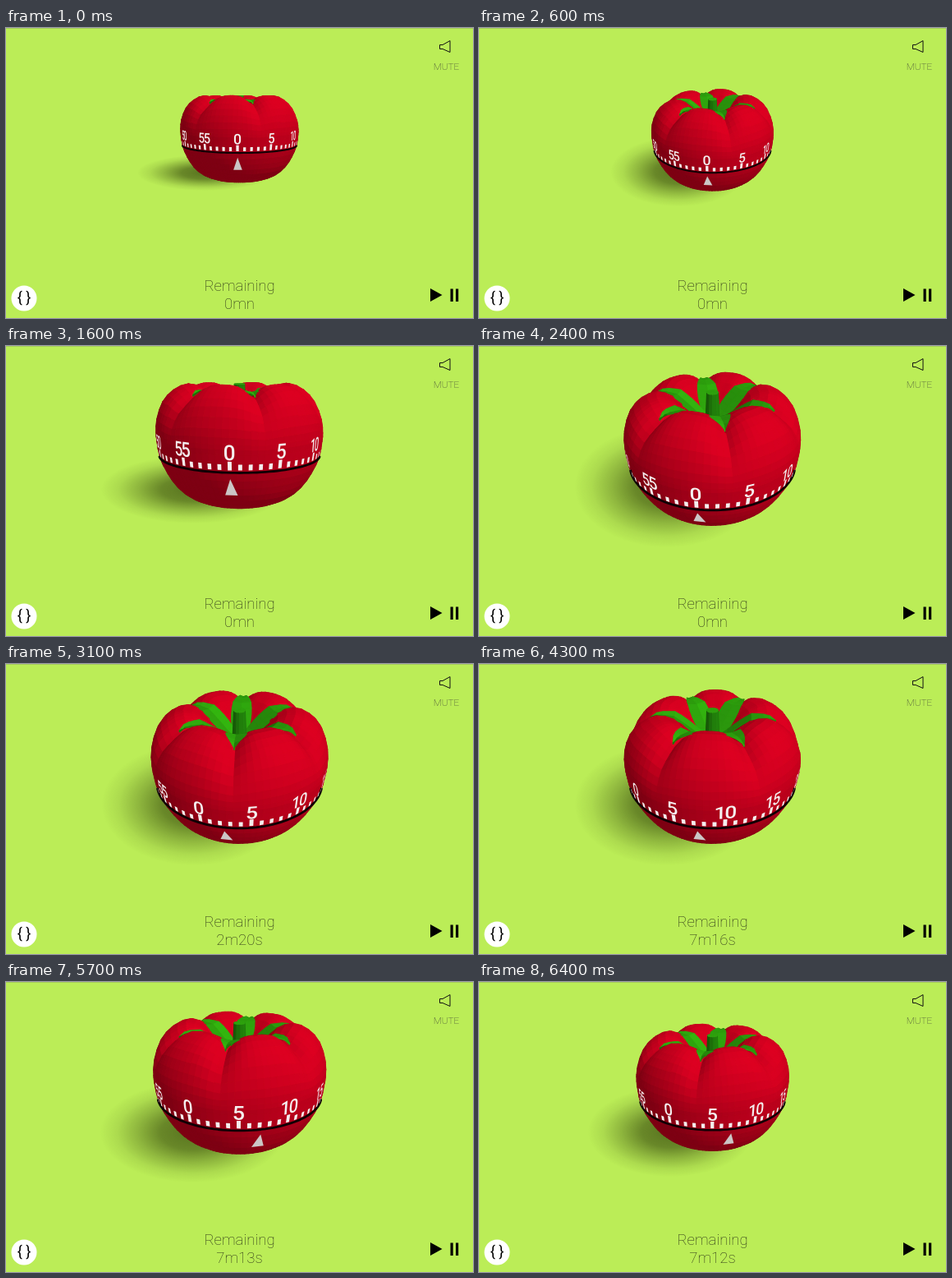
An HTML page with a canvas for the animation above (6.5 s loop, 569 px wide and 353 px high).

```html
<!DOCTYPE html>
<html lang="en">
<head>
<meta charset="utf-8">
<title>Tomato timer</title>
<style>
html, body { margin: 0; width: 100%; height: 100%; overflow: hidden; background: #bbed57; }
canvas, svg { position: absolute; left: 0; top: 0; }
text { font-family: Roboto, sans-serif; font-weight: 200; text-anchor: middle; }
</style>
</head>
<body>
<canvas id="stage" width="569" height="353"></canvas>
<svg width="569" height="353">
  <path d="M0 .5H569" stroke="#a5ca5d"/>
  <path d="M528.5 20.5H532L541 15.5V29.5L532 25.5H528.5Z" fill="none" stroke="#111"/>
  <text x="536.5" y="51" font-size="11.7" fill="#333">MUTE</text>
  <text x="284.5" y="320" font-size="18.6" fill="#2c3318">Remaining</text>
  <text x="284.5" y="342" font-size="18.6" fill="#2c3318" id="left">0mn</text>
  <circle cx="22" cy="329" r="15.5" fill="#fff"/>
  <text x="22" y="333.5" font-size="18" style="font-weight:400">{ }</text>
  <path d="M517 317L531.5 325L517 333ZM541.5 317.5h3.2v15.5h-3.2ZM548 317.5h3.2v15.5h-3.2Z"/>
</svg>
<script>
const ctx = document.getElementById('stage').getContext('2d');
const label = document.getElementById('left');
const { sin, cos, abs, max, min, floor, hypot, PI } = Math;
const LOOP = 6500, FOCAL = 426, CX = 284.5, CY = 176.5, RAD = PI / 180;
const SEGS = 90, SUB = 2, SPLIT = 5, SEAM = .515;

// time, distance, elevation, azimuth
const CAMERA = [
  [0, 6.2, 12.3, -1.7], [300, 6.2, 12.3, -1.7], [600, 6.2, 27.5, -4.6],
  [1000, 5.9, 34, -5.5], [1300, 4.55, 33, -5.6], [1500, 4.55, 33, -5.6],
  [1600, 4.55, 18.4, -5.6], [2200, 4.55, 37.5, -9.2], [4300, 4.55, 37.5, -9.2],
  [5000, 4.55, 29.5, 12.9], [5800, 4.55, 29.5, 12.9], [6400, 5.08, 29.5, 13.1]
];
// time, seconds on the dial
const DIAL = [[0, 0], [2400, 0], [2800, 100], [2950, 100], [4200, 436.7], [6500, 432.1]];

// height, radius from the foot up to the stem
const PROFILE = [
  [-.07, .3], [-.05, .48], [.03, .67], [.16, .81], [.33, .91], [SEAM, .98], [.7, .998],
  [.8, 1], [.95, .98], [1.14, .9], [1.27, .77], [1.335, .6], [1.28, .42], [1.13, .26],
  [.99, .12], [.94, 0]
];
// Six lobes; a leaf lies along each crease between them.
const LOBES = 6, CREASE = 19 * RAD, DEPTH = .14;
const RED = [222, 0, 34], GREEN = [52, 182, 16];
const LIGHT = [.45, .74, .5];

function interp(rows, x) {
  let i = rows.findIndex(r => r[0] >= x);
  if (i < 0) return rows[rows.length - 1].slice(1);
  i = max(1, i);
  const a = rows[i - 1], b = rows[i], k = (x - a[0]) / (b[0] - a[0]);
  return a.slice(1).map((v, n) => v + (b[n + 1] - v) * k);
}

const TOP = PROFILE.slice(8).reverse().map(([y, r]) => [r, y]);
const wall = y => interp(PROFILE.slice(0, 12), y)[0];
const lid = r => interp(TOP, r)[0];

function smooth(points) {
  const rows = [], at = i => points[min(points.length - 1, max(0, i))];
  for (let i = 0; i < points.length - 1; i++)
    for (let s = 0; s < SUB; s++) {
      const t = s / SUB;
      rows.push([0, 1].map(n => {
        const [a, b, c, d] = [-1, 0, 1, 2].map(o => at(i + o)[n]);
        return b + t / 2 * (c - a + t * (2 * a - 5 * b + 4 * c - d + t * (3 * b - a - 3 * c + d)));
      }));
    }
  return [...rows, at(points.length)];
}
const ROWS = smooth(PROFILE);

let dist, elev, azim, turn, faces;

const polar = (r, angle, y) => [r * sin(angle), y, r * cos(angle)];

function project([x, y, z]) {
  const w = z * cos(elev) + y * sin(elev), s = FOCAL / (dist - w);
  return [CX + x * s, CY - (y * cos(elev) - z * sin(elev)) * s, w];
}

// negative for outlines that face the viewer
const winding = ([a, b, c, d]) =>
  (c[0] - a[0]) * (d[1] - b[1]) - (c[1] - a[1]) * (d[0] - b[0]);

function trace(points) {
  ctx.beginPath();
  points.forEach(p => ctx.lineTo(p[0], p[1]));
}

function fill(points, color) {
  trace(points);
  ctx.closePath();
  ctx.fillStyle = color;
  ctx.fill();
}

function addFace(quad, base, bias = 0, twoSided = false) {
  const pts = quad.map(project);
  if (!twoSided && winding(pts) >= 0) return;
  const [a, b, c, d] = quad;
  const u = c.map((v, i) => v - a[i]), v = d.map((q, i) => q - b[i]);
  let n = [u[1] * v[2] - u[2] * v[1], u[2] * v[0] - u[0] * v[2], u[0] * v[1] - u[1] * v[0]];
  if (twoSided && n[1] < 0) n = n.map(q => -q);
  const size = hypot(...n) || 1;
  const lit = .57 + .43 * max(0, n.reduce((sum, q, i) => sum + q * LIGHT[i], 0) / size);
  faces.push({
    pts, w: pts.reduce((sum, p) => sum + p[2], 0) / 4 + bias,
    color: `rgb(${base.map(q => floor(q * lit))})`
  });
}

function addBody() {
  const vertex = ([y, r], j, spin) => {
    const angle = j / SEGS * 2 * PI;
    const crease = (1 - abs(sin(LOBES / 2 * (angle - CREASE)))) ** 1.6;
    const k = crease * min(1, max(0, (y - .65) / .6)) ** 1.5;
    return polar(r * (1 - .03 * k), angle + spin, y - DEPTH * k * min(1, r * 2));
  };
  for (let i = 0; i < ROWS.length - 1; i++) {
    const spin = i >= SPLIT * SUB ? azim - turn : azim;
    for (let j = 0; j < SEGS; j++)
      addFace([vertex(ROWS[i], j, spin), vertex(ROWS[i], j + 1, spin),
        vertex(ROWS[i + 1], j + 1, spin), vertex(ROWS[i + 1], j, spin)], RED);
  }
}

function addLeaf(angle) {
  const n = 10;
  const vertex = (i, side) => {
    const s = i / n, r = .04 + .64 * s;
    const half = side * .115 * max(0, sin(PI * (.15 + .85 * s))) ** .8;
    const y = lid(r) - DEPTH * min(1, r * 1.5) + .07 - (side ? 0 : .015);
    return [r * sin(angle) + half * cos(angle), y, r * cos(angle) - half * sin(angle)];
  };
  for (let i = 0; i < n; i++)
    for (const side of [-1, 0])
      addFace([vertex(i, side), vertex(i, side + 1), vertex(i + 1, side + 1), vertex(i + 1, side)],
        side ? GREEN : GREEN.map(q => q * .92), .1, true);
}

function addStem() {
  const n = 12, foot = .95, tip = 1.33;
  for (let j = 0; j < n; j++) {
    const a = j / n * 2 * PI, b = (j + 1) / n * 2 * PI;
    addFace([polar(.08, a, foot), polar(.08, b, foot), polar(.06, b, tip), polar(.06, a, tip)],
      [40, 150, 14], .14);
    addFace([polar(.06, a, tip), polar(.06, b, tip), [0, tip, 0], [0, tip, 0]], GREEN, .2, true);
  }
}

function drawShadow() {
  const [x, y] = project(polar(.61, azim - 90 * RAD, 0));
  const r = 1.2 * FOCAL / dist;
  const g = ctx.createRadialGradient(0, 0, 0, 0, 0, r);
  [[0, .72], [.35, .6], [.6, .32], [.82, .1], [1, 0]].forEach(([stop, alpha]) =>
    g.addColorStop(stop, `rgba(50,68,10,${alpha})`));
  ctx.save();
  ctx.translate(x, y);
  ctx.scale(1, sin(elev) + .05);
  ctx.fillStyle = g;
  ctx.fillRect(-r, -r, 2 * r, 2 * r);
  ctx.restore();
}

const onWall = (angle, y) => project(polar(wall(y) + .003, angle, y));

function drawDigit(digit, angle, y) {
  const d = .01, k = .0021 / d;
  const p = onWall(angle, y), right = onWall(angle + d, y), up = onWall(angle, y + d);
  const ax = (right[0] - p[0]) * k, ay = (right[1] - p[1]) * k;
  const bx = (p[0] - up[0]) * k, by = (p[1] - up[1]) * k;
  if (ax * by - ay * bx <= 0) return;
  ctx.setTransform(ax, ay, bx, by, p[0], p[1]);
  ctx.fillText(digit, 0, 35.5);
  ctx.resetTransform();
}

function drawMarks() {
  ctx.font = '500 100px Roboto, sans-serif';
  ctx.textAlign = 'center';
  for (let m = 0; m < 60; m++) {
    const angle = m * 6 * RAD + azim - turn, major = m % 5 === 0;
    const low = .54, high = major ? .63 : .6, half = .02;
    const tick = [onWall(angle - half, low), onWall(angle + half, low),
      onWall(angle + half, high), onWall(angle - half, high)];
    if (winding(tick) < 0) fill(tick, '#f4eeee');
    if (!major) continue;
    const text = String(m);
    ctx.fillStyle = '#f4eeee';
    [...text].forEach((c, i) => drawDigit(c, angle + (i - (text.length - 1) / 2) * .1, .72));
  }
}

function drawBand() {
  const edge = Math.acos(min(1, .98 / (dist * cos(elev) - .1)));
  const line = [];
  for (let i = -30; i <= 30; i++) line.push(onWall(i / 30 * edge, SEAM));
  trace(line);
  ctx.strokeStyle = '#100004';
  ctx.lineWidth = 2.8 * 4.55 / dist;
  ctx.stroke();
}

function draw(time) {
  const seconds = interp(DIAL, time)[0];
  [dist, elev, azim] = interp(CAMERA, time);
  elev *= RAD;
  azim *= RAD;
  turn = seconds / 10 * RAD;
  faces = [];

  ctx.clearRect(0, 0, 569, 353);
  drawShadow();
  addBody();
  for (let i = 0; i < LOBES; i++) addLeaf(CREASE + i / LOBES * 2 * PI + azim - turn);
  addStem();
  faces.sort((a, b) => a.w - b.w);
  ctx.lineWidth = 1.2;
  ctx.lineJoin = 'round';
  for (const f of faces) {
    fill(f.pts, f.color);
    ctx.strokeStyle = f.color;
    ctx.stroke();
  }
  drawBand();
  drawMarks();
  fill([onWall(azim, .44), onWall(azim + .078, .235), onWall(azim - .078, .235)], '#cbc6c6');

  const whole = floor(seconds);
  label.textContent = whole ? `${floor(whole / 60)}m${whole % 60}s` : '0mn';
}

// The picture advances in tenths of a second.
let shown = -1;
const start = performance.now();
function tick() {
  const time = floor((performance.now() - start) % LOOP / 100) * 100;
  if (time !== shown) draw(shown = time);
  requestAnimationFrame(tick);
}
tick();
</script>
</body>
</html>
```
